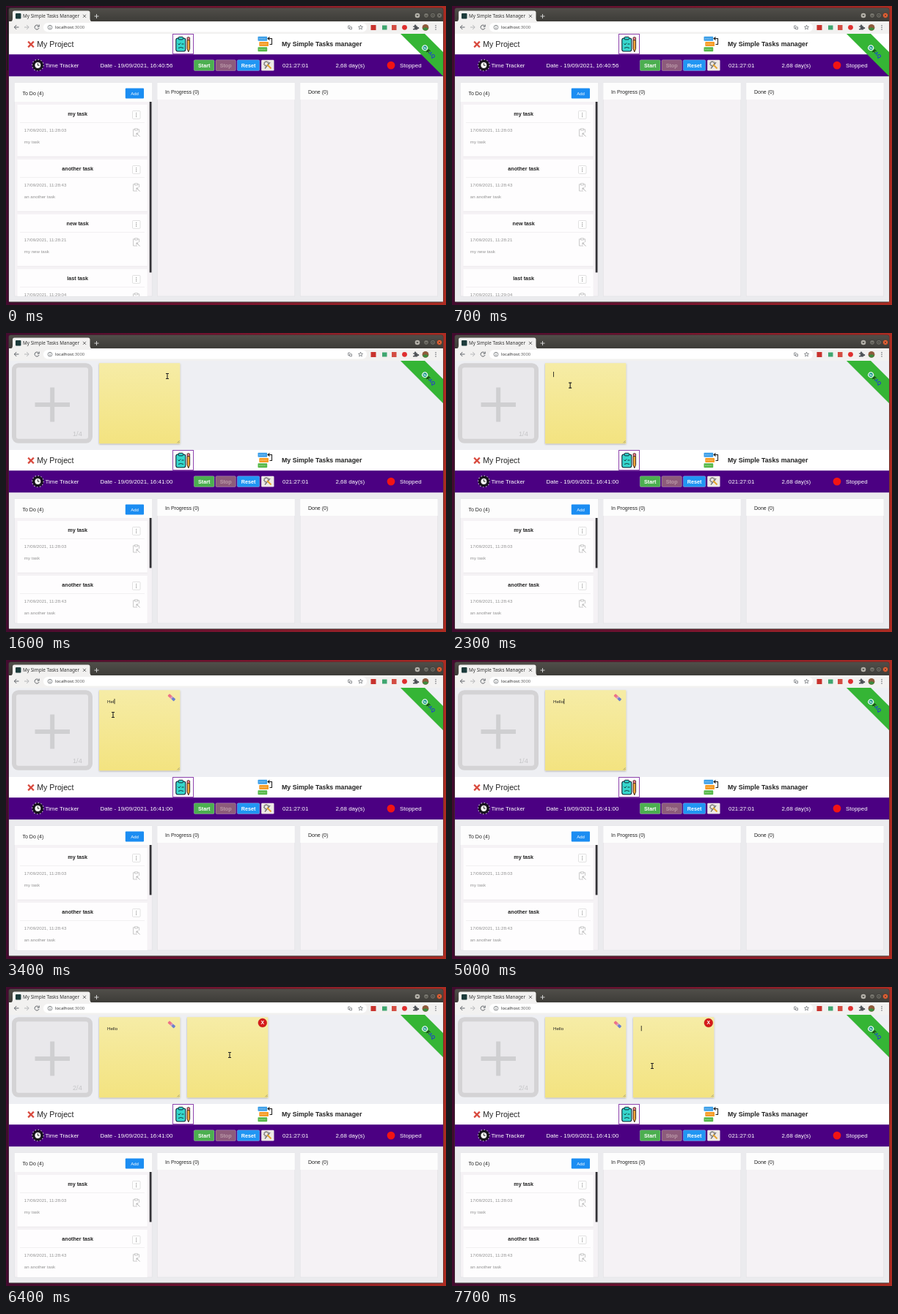
An HTML page for the animation above (8 s loop, 600x409 px).

```html
<!DOCTYPE html>
<html lang="en">
<head>
<meta charset="utf-8">
<title>Task board</title>
<style>
html, body { margin: 0; width: 100%; height: 100%; overflow: hidden; background: #4a0d30; }
svg { display: block; width: 100%; height: 100%; }
text { font-family: "Liberation Sans", Arial, sans-serif; white-space: pre; }
.ui { font-family: "Noto Sans", sans-serif; }
</style>
</head>
<body>
<svg id="stage" viewBox="0 0 600 409" xmlns="http://www.w3.org/2000/svg"></svg>
<script>
const LOOP = 8000, PANEL = 122, BOTTOM = 397;
const stage = document.getElementById('stage');

const rect = (x, y, w, h, fill, more = '') =>
  `<rect x="${x}" y="${y}" width="${w}" height="${h}" fill="${fill}" ${more}/>`;
const circle = (x, y, r, fill, more = '') =>
  `<circle cx="${x}" cy="${y}" r="${r}" fill="${fill}" ${more}/>`;
const line = (d, color, width = 1, more = '') =>
  `<path d="${d}" fill="none" stroke="${color}" stroke-width="${width}" ${more}/>`;
const text = (x, y, size, fill, str, more = '') =>
  `<text x="${x}" y="${y}" font-size="${size}" fill="${fill}" ${more}>${str}</text>`;
const group = (id, body, more = '') => `<g id="${id}" ${more}>${body}</g>`;
const BOLD = 'font-weight="700"', MID = 'text-anchor="middle"';

const defs = `<defs>
  <linearGradient id="desk" x2="1" y2="0"><stop stop-color="#430b2f"/><stop offset=".5" stop-color="#74132f"/><stop offset="1" stop-color="#ad2c22"/></linearGradient>
  <linearGradient id="bar" x2="0" y2="1"><stop stop-color="#504e49"/><stop offset="1" stop-color="#3c3b37"/></linearGradient>
  <linearGradient id="paper" x2="0" y2="1"><stop stop-color="#f6eca6"/><stop offset="1" stop-color="#f3e380"/></linearGradient>
  <filter id="soft" x="-10%" y="-10%" width="120%" height="125%"><feDropShadow dx="0" dy="1" stdDeviation="1.2" flood-opacity=".3"/></filter>
  <filter id="faint" x="-10%" y="-10%" width="120%" height="125%"><feDropShadow dx="0" dy=".3" stdDeviation=".7" flood-opacity=".11"/></filter>
  <clipPath id="page"><rect x="4" y="38" width="592" height="366.500"/></clipPath>
  <clipPath id="view"><rect id="viewBox" x="12" y="131" width="187" height="266"/></clipPath>
</defs>`;

function browser() {
  const ink = '#5f6368';
  const star = Array.from({length: 10}, (_, i) => {
    const a = i * Math.PI / 5 - Math.PI / 2, r = i % 2 ? 1.4 : 3.2;
    return `${(483.5 + r * Math.cos(a)).toFixed(1)},${(29.3 + r * Math.sin(a)).toFixed(1)}`;
  }).join(' ');
  return rect(0, 0, 600, 409, 'url(#desk)') +
    group('backWindow', rect(0, 2, 80, 1, '#2a2024') + rect(1.5, 2, 2, 86, '#1c181b')) +
    rect(3.5, 2.5, 593, 403, '#3b3a36', 'rx="3"') + rect(4, 3, 592, 19, 'url(#bar)', 'rx="3"') +
    `<path d="M6 21.500Q9 21 9 17V9Q9 6.500 11.500 6.500H112Q114.500 6.500 114.500 9V17Q114.500 21 117.500 21.500Z" fill="#f2f1f0"/>` +
    rect(13, 10, 7.5, 7.5, '#1c3b3b', 'rx="1"') +
    text(23, 16.3, 6.35, '#333', 'My Simple Tasks Manager', 'class="ui"') +
    line('M105 11.800L109 15.800M109 11.800L105 15.800', '#555', .9) +
    line('M120.500 14H126.500M123.500 11V17', '#ddd', .9) +
    circle(561, 13, 3.3, '#b5b2aa') + `<path d="M559.300 12.200H562.700L561 14.300Z" fill="#3b3a36"/>` +
    [573, 582].map(x => circle(x, 12.8, 3.4, '#75736c', 'stroke="#302f2b" stroke-width=".6"')).join('') +
    circle(591, 12.8, 3.6, '#ec6335', 'id="closeDot" stroke="#302f2b" stroke-width=".6"') +
    line('M571.500 13.500H574.500M580.800 11.600H583.200V14H580.800ZM589.700 11.500L592.300 14.100M592.300 11.500L589.700 14.100', '#33312d', .7) +
    rect(4, 21, 592, 17, '#f2f1f0') + rect(51, 23, 441, 12.5, '#fff', 'rx="6.200"') +
    line('M17.500 29H11.500M14.300 26L11.300 29L14.300 32', ink, 1) +
    line('M25 29H31M28.200 26L31.200 29L28.200 32', '#b4b6b8', 1) +
    line('M44.700 27.500A3 3 0 1 0 45 30M45.200 25.500V28.200H42.500', ink, 1) +
    circle(60, 29.2, 2.9, 'none', `stroke="${ink}" stroke-width=".7"`) + line('M60 28.700V31M60 27.200V28', ink, .8) +
    text(67, 31.4, 5.95, '#333', 'localhost<tspan fill="#666">:3000</tspan>', 'class="ui"') +
    line('M469.500 27H466.700V30.500H468.500M468.700 28.800H471.500V31.800H468.700Z', ink, .7) +
    `<polygon points="${star}" fill="none" stroke="${ink}" stroke-width=".7"/>` +
    rect(497.5, 26, 7, 7, '#c8322c') + rect(513, 26.5, 6.5, 6, '#3fa66f') +
    rect(526, 26, 6.5, 7, '#d34d42') + circle(543.5, 29.3, 3.4, '#df2f2f') +
    `<path d="M555 27.500H557A1.300 1.300 0 1 1 559.200 27.500H561V29.300A1.300 1.300 0 1 1 561 31V32.500H555V30.700A1.200 1.200 0 1 0 555 29Z" fill="#4f5358"/>` +
    circle(572, 29.4, 4.4, '#8f5a3c') + `<path d="M568 31A4.400 4.400 0 0 0 576 31Q572 27.500 568 31Z" fill="#3d8a3d"/>` +
    [26.7, 29.3, 31.9].map(y => circle(586, y, .75, ink)).join('');
}

function notesIcon() {
  return rect(227.5, 38.5, 28, 27, '#fff', 'id="iconBox" stroke="#8e44ad" stroke-width="1"') +
    rect(231.8, 44, 13, 18, '#35d6cc', 'rx="2.500" stroke="#123" stroke-width="1.100"') +
    rect(235.2, 42.3, 6.2, 3.6, '#35d6cc', 'rx="1" stroke="#123" stroke-width="1"') +
    line('M234.500 51.500L236 53L238 50.500M239.500 52H242.500M235 57.500Q238 55.500 242 57.500', '#133c3c', 1) +
    `<path d="M247 46.500V58.500L248.800 62.800L250.600 58.500V46.500Z" fill="#f3a53b" stroke="#2b1a10" stroke-width=".9"/>` +
    rect(247, 42.7, 3.6, 4, '#e8788a', 'stroke="#2b1a10" stroke-width=".8" rx="1"');
}

function header() {
  const button = (x, w, fill, label, color = '#fff') =>
    rect(x, 73.7, w, 14.8, fill, 'rx="1.500" stroke="#fff" stroke-opacity=".3" stroke-width=".8"') +
    text(x + w / 2, 83.5, 7.2, color, label, `${BOLD} ${MID}`);
  const bars = [[343.5, 41.8, '#3b9ee8'], [345.3, 49, '#f59a23'], [343.5, 56.3, '#55b848']];
  return rect(4, 38, 592, 28.2, '#fff') +
    line('M31 49.500L37 55.500M37 49.500L31 55.500', '#d8483c', 2.3, 'stroke-linecap="square"') +
    text(42.3, 55.6, 10.6, '#222', 'My Project') + notesIcon() +
    bars.map(([x, y, c]) => rect(x, y, 12.7, 6, c, 'rx=".800"') +
      line(`M${x + 1.5} ${y + 3}H${x + 11}`, '#fff', .8, 'stroke-dasharray="1.500 .800" opacity=".700"')).join('') +
    line('M357.500 44.500H362.500V52.500H359.500M359.500 42.500L357 44.500L359.500 46.500', '#222', 1.1) +
    text(376, 55, 8.8, '#222', 'My Simple Tasks manager', BOLD) +
    rect(4, 66.2, 592, 30, '#4b0082') +
    circle(43.4, 81, 7.8, '#17101f', 'stroke="#d9d3e4" stroke-width="1.100" stroke-dasharray="1.300 2.780"') +
    circle(43.4, 81, 4.5, '#fff', 'stroke="#111" stroke-width="1"') + line('M43.400 78.200V81.200H45.700', '#111', .9) +
    text(53.5, 83.8, 7.95, '#fff', 'Time Tracker') +
    text(128.5, 83.8, 7.95, '#fff', '', 'id="clock"') +
    button(256.3, 27.7, '#4caf50', 'Start') + button(286, 27.3, '#8d5c7b', 'Stop', '#bb9aa8') +
    button(315.3, 30.4, '#2196f3', 'Reset') +
    rect(348.2, 73.7, 17.3, 14.8, '#eee9e6', 'rx="1.200"') +
    circle(355, 79, 2.9, 'none', 'stroke="#555" stroke-width="1.700" stroke-dasharray="1.200 .700"') +
    line('M353 85.500L360 77', '#777', 1.4) + line('M356 80L361.500 85.500', '#e6a52f', 1.9) +
    text(377, 83.8, 7.95, '#fff', '021:27:01') + text(449.5, 83.8, 7.95, '#fff', '2,68 day(s)') +
    circle(525, 81.1, 5.4, '#f21414') + text(537, 83.8, 7.95, '#fff', 'Stopped');
}

function card([title, time, note], i) {
  const grey = '#929292';
  return `<g transform="translate(0 ${i * 75})">` + rect(15.3, 135, 177.5, 70.7, '#fefdfe', 'filter="url(#faint)"') +
    text(97.7, 149.6, 7.2, '#222', title, `${BOLD} ${MID}`) +
    rect(172.5, 143.5, 10.5, 10.8, '#fff', 'rx="1" stroke="#d5d5d5" stroke-width=".700"') +
    [146.6, 148.9, 151.2].map(y => circle(177.7, y, .6, '#777')).join('') +
    line('M19 159.500H189', '#efeeef', .8) +
    text(24.8, 172, 6.15, grey, time) + text(24.8, 187.6, 6.15, grey, note) +
    line('M175.500 168.800H173.500V178H179M179.500 168.800H181.500V173M175.500 167.800H179.500V170H175.500Z', '#bdbdbd', .8) +
    line('M178 174L182.500 178.500M178 174V176.500M178 174H180.500', '#b0b0b0', .9) + '</g>';
}

function board() {
  const tasks = [['my task', '03'], ['another task', '43', 'an another task'], ['new task', '21', 'my new task'], ['last task', '04', 'my last task']];
  const cards = tasks.map(([name, sec, note = name], i) =>
    card([name, `17/09/2021, 11:${i > 2 ? 29 : 28}:${sec}`, note], i)).join('');
  const column = (x, head, label) =>
    rect(x, 105, 187.5, 292, '#f5f2f5', 'class="col" stroke="#e2e1e4" stroke-width=".600"') +
    rect(x, 105, 187.5, head, '#fdfdfd') + text(x + 10.8, head > 24 ? 121.9 : 120.4, 7, '#222', label);
  return column(11.7, 26, 'To Do (4)') + column(206.3, 23, 'In Progress (0)') + column(401.2, 23, 'Done (0)') +
    rect(162.8, 112.5, 25.2, 14, '#1b8df2', 'rx="1"') + text(175.5, 121.7, 6, '#fff', 'Add', MID) +
    `<g clip-path="url(#view)">${cards}</g>` + rect(195.7, 131, 2.8, 233, '#333236', 'id="thumb"');
}

function panel() {
  const paper = x => rect(x, 41.2, 110.3, 110, 'url(#paper)', 'filter="url(#soft)"') +
    line(`M${x + 106.5} 150.300L${x + 109.5} 147.300M${x + 108.3} 150.500L${x + 109.7} 149.100`, '#777', .6);
  const caret = id => rect(0, 53, .8, 7.2, '#111', `id="${id}"`);
  const eraser = '<g transform="translate(225.800 51.300) rotate(42)">' +
    rect(-5.6, -2, 5.2, 4, '#ee7387', 'rx="1"') + rect(-1.2, -2, 2.6, 4, '#d79cc0') + rect(1.2, -2, 4.4, 4, '#6c80cf', 'rx=".800"') + '</g>';
  return rect(4, 38, 592, PANEL, '#eeeff3') +
    rect(11, 44.2, 104, 103.6, '#e9e8eb', 'rx="6" stroke="#d4d3d5" stroke-width="6"') +
    line('M39.500 98H87M63.200 74.500V121.500', '#cfcfd1', 6) +
    text(91, 140.7, 9.2, '#c6c6c8', '', 'id="count"') +
    paper(127) + text(138, 59, 6.2, '#222', '', 'id="typed"') + caret('caret1') + group('eraser', eraser) +
    group('second', paper(247) + circle(349.8, 49, 5.9, '#d51a1a', 'stroke="#b01414" stroke-width=".400"') +
      text(349.8, 51.4, 6.8, '#fff', 'X', `${BOLD} ${MID}`) + caret('caret2'));
}

function ribbon() {
  return '<path d="M538 38H571L596 63V96Z" fill="#35b535" filter="url(#faint)"/>' +
    '<g transform="translate(577 63) rotate(45)">' +
    circle(-8.2, 0, 3.4, '#1f9c8c', 'stroke="#fff" stroke-width="1.100"') + line('M-9.700 0L-8.500 1.300L-6.500 -1.200', '#fff', .9) +
    text(-3.6, 2.4, 6.8, '#111', 'F<tspan fill="#1b4fc4">A</tspan><tspan fill="#2334d6">Q</tspan>', BOLD) + '</g>';
}

const pointers =
  group('arrow', '<path d="M0 0V9L2.100 7.100L3.500 10.200L5 9.500L3.600 6.600H6.400Z" fill="#111" stroke="#fff" stroke-width=".700"/>') +
  group('hand', '<path d="M-1 0Q0 -1 1 0V3.500L4 4.200Q5 4.500 4.800 6L4 9H-.600L-3 5.500Q-2.500 4.300 -1 5.500Z" fill="#fff" stroke="#111" stroke-width=".800"/>') +
  group('beam', line('M-2 -3.500H-.500L0 -3L.500 -3.500H2M0 -3V3M-2 3.500H-.500L0 3L.500 3.500H2', '#222', 1.1));

stage.innerHTML = defs + browser() + '<g clip-path="url(#page)">' + rect(4, 38, 592, 367, '#ebebee') +
  group('panel', panel()) + group('lower', header() + board()) + ribbon() + '</g>' + group('pointer', pointers);

const ui = {};
stage.querySelectorAll('[id]').forEach(el => ui[el.id] = el);
const columns = stage.querySelectorAll('.col');
const show = (el, on) => el.setAttribute('display', on ? 'inline' : 'none');
const set = (el, name, value) => el.setAttribute(name, value);
const within = (t, from, to) => t >= from && t < to;

// time, x, y
const path = [
  [800, 400, -14], [1400, 240, 51], [1500, 240, 51], [1600, 220, 59], [1900, 205, 62], [2500, 146, 75],
  [4250, 146, 75], [4500, 215, -14], [5250, 215, -14], [5700, 90, 85], [5900, 66, 98], [6050, 66, 98],
  [6400, 305, 93], [6750, 268, 84], [7300, 273, 108], [LOOP, 273, 108]
];
function pointerAt(t) {
  const i = path.findIndex(p => p[0] > t);
  if (i < 1) return path[0].slice(1);
  const [t0, x0, y0] = path[i - 1], [t1, x1, y1] = path[i];
  const u = (t - t0) / (t1 - t0), k = u * u * (3 - 2 * u);
  return [x0 + (x1 - x0) * k, y0 + (y1 - y0) * k];
}

const keys = [2900, 3200, 3400, 3800, 3900];
const ADVANCE = [0, .722, 1.278, 1.5, 1.722, 2.278];

function draw(t) {
  const open = t >= 1600, two = t >= 6000, shift = open ? PANEL : 0;
  show(ui.backWindow, t < 500);
  set(ui.closeDot, 'fill', t < 500 ? '#75736c' : '#ec6335');
  show(ui.panel, open);
  set(ui.lower, 'transform', `translate(0 ${shift})`);
  columns.forEach(c => set(c, 'height', BOTTOM - 105 - shift));
  const view = BOTTOM - 131 - shift;
  set(ui.viewBox, 'height', view);
  set(ui.thumb, 'height', view * view / 303);
  ui.clock.textContent = 'Date - 19/09/2021, 16:' + (open ? '41:00' : '40:56');

  const n = keys.filter(k => t >= k).length;
  ui.typed.textContent = 'Hello'.slice(0, n);
  ui.count.textContent = (two ? 2 : 1) + '/4';
  show(ui.eraser, n > 0);
  show(ui.second, two);
  set(ui.caret1, 'x', 138 + ADVANCE[n] * 6.2 + (n ? .3 : 0));
  show(ui.caret1, within(t, 2200, 2700) || within(t, 2900, 4500) || within(t, 5000, 5500));
  set(ui.caret2, 'x', 257.8);
  show(ui.caret2, within(t, 6700, 7200) || t >= 7700);

  const [x, y] = pointerAt(t);
  const overIcon = !open && within(x, 228, 256) && within(y, 39, 67);
  const overPlus = open && within(x, 8, 118) && within(y, 41, 152);
  const overNote = open && within(y, 41, 152) && (within(x, 127, 238) || two && within(x, 247, 358));
  set(ui.iconBox, 'fill', overIcon ? '#c58be0' : '#fff');
  set(ui.pointer, 'transform', `translate(${x.toFixed(2)} ${y.toFixed(2)})`);
  show(ui.hand, overIcon || overPlus);
  show(ui.beam, overNote);
  show(ui.arrow, !overIcon && !overPlus && !overNote);
}

const start = performance.now();
function tick() {
  draw((performance.now() - start) % LOOP);
  requestAnimationFrame(tick);
}
tick();
</script>
</body>
</html>
```
